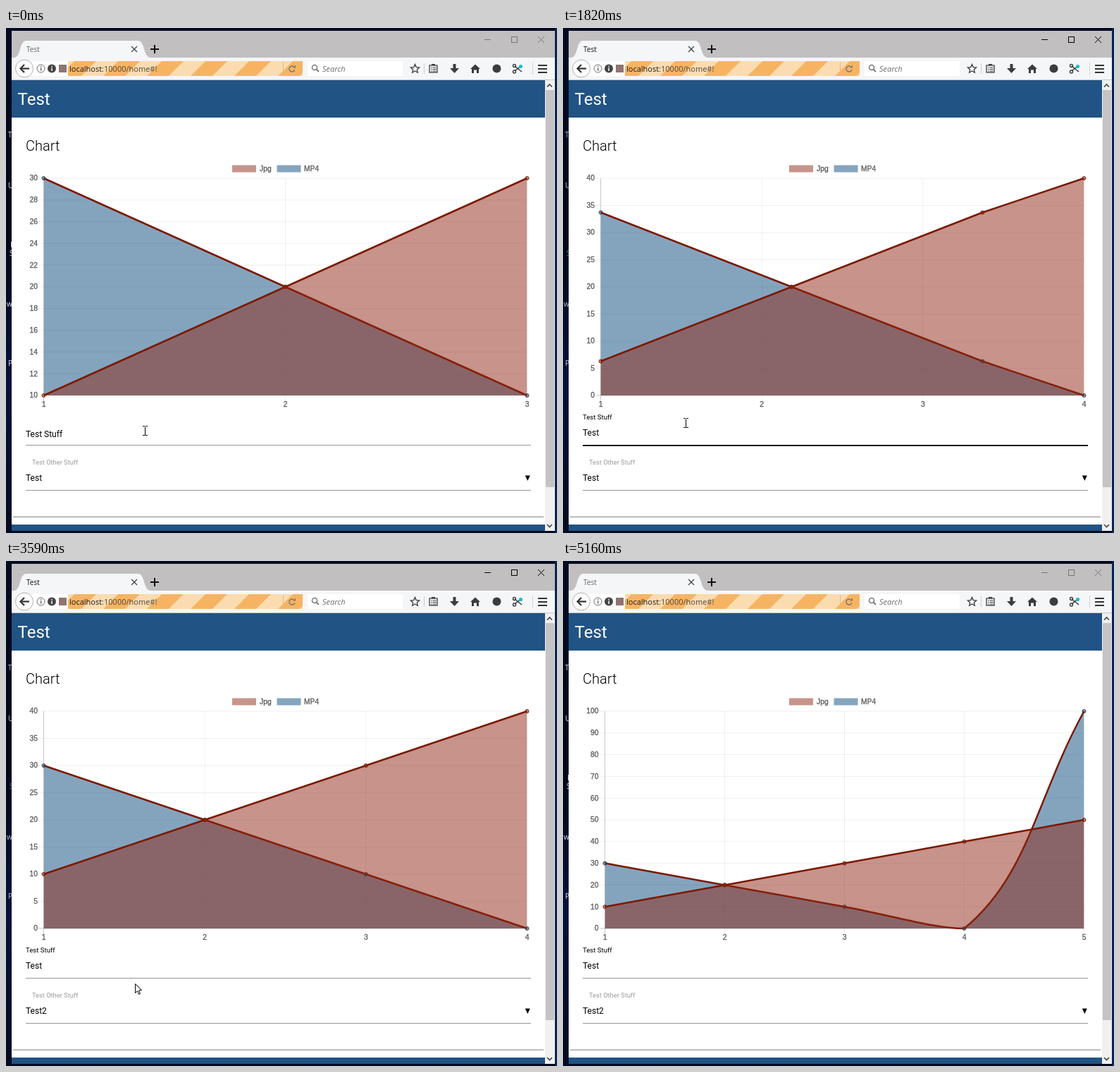
Animation of 782x716 px, one loop 5.19 s. Source, as an HTML page with a canvas:

```html
<!DOCTYPE html>
<html lang="en">
<head>
<meta charset="utf-8">
<title>Chart demo</title>
<style>
html, body { margin: 0; width: 100%; height: 100%; overflow: hidden; background: #030a20; }
canvas { display: block; }
</style>
</head>
<body>
<canvas id="stage" width="782" height="716"></canvas>
<script>
const ctx = document.getElementById('stage').getContext('2d');
const LOOP = 5190;
const UI = '"Open Sans", sans-serif';
const ROBOTO = 'Roboto, sans-serif';
const ARIAL = '"Liberation Sans", sans-serif';

// Moments of the interaction, in ms
const ACTIVATE = 550, TITLE_ON = 780, DEACTIVATE = 4930, TITLE_OFF = 5160;
const KEYS = [1040, 1160, 1220, 1340];
const MENU_OPEN = 2775, PICK = 3320;
const CHART_MS = 822, BLINK = 435;

const clamp = v => Math.max(0, Math.min(1, v));
const mix = (a, b, k) => a + (b - a) * k;
const ramp = (t, start, length) => clamp((t - start) / length);

function rect(x, y, w, h, color) {
  ctx.fillStyle = color;
  ctx.fillRect(x, y, w, h);
}

function text(s, x, y, font, color, align = 'left') {
  ctx.font = font;
  ctx.fillStyle = color;
  ctx.textAlign = align;
  ctx.fillText(s, x, y);
}

function line(points, color, width = 1) {
  ctx.beginPath();
  points.forEach(([x, y]) => ctx.lineTo(x, y));
  ctx.strokeStyle = color;
  ctx.lineWidth = width;
  ctx.stroke();
}

function shape(points, fill, stroke, width = 1) {
  ctx.beginPath();
  points.forEach(([x, y]) => ctx.lineTo(x, y));
  ctx.closePath();
  paint(fill, stroke, width);
}

function circle(x, y, r, fill, stroke, width = 1) {
  ctx.beginPath();
  ctx.arc(x, y, r, 0, 2 * Math.PI);
  paint(fill, stroke, width);
}

function paint(fill, stroke, width) {
  if (fill) { ctx.fillStyle = fill; ctx.fill(); }
  if (stroke) { ctx.strokeStyle = stroke; ctx.lineWidth = width; ctx.stroke(); }
}

function clipped(x, y, w, h, draw) {
  ctx.save();
  ctx.beginPath();
  ctx.rect(x, y, w, h);
  ctx.clip();
  draw();
  ctx.restore();
}

// ---- Desktop and browser window ----

function drawDesktop(active) {
  const sky = ctx.createLinearGradient(0, 0, 0, 716);
  sky.addColorStop(0, '#030a22');
  sky.addColorStop(0.4, '#020617');
  sky.addColorStop(0.7, '#04123a');
  sky.addColorStop(1, '#030a20');
  rect(0, 0, 782, 716, sky);
  rect(779, 0, 3, 716, '#0a2450');
  const ink = active ? '#b9c4d4' : '#e4e8ee';
  [['T', 3, 155], ['U', 3, 227], ['w', 1, 395], ['P', 3, 479]]
    .forEach(([s, x, y]) => text(s, x, y, '10px ' + UI, ink));
  if (!active) text('I', 6, 311, '10px ' + UI, ink);
  text('S', 5, 323, '10px ' + UI, active ? '#5f7fb4' : ink);
}

function drawTitleBar(lit) {
  const ink = lit ? '#000' : '#777';
  rect(8, 4, 771, 709, '#f5f6f7');
  rect(8, 4, 771, 38, '#c1bfc0');
  ctx.beginPath();
  ctx.moveTo(11, 42);
  ctx.bezierCurveTo(22, 42, 18, 18, 29, 18);
  ctx.lineTo(187, 18);
  ctx.bezierCurveTo(198, 18, 194, 42, 206, 42);
  paint('#f5f6f7');
  text('Test', 29, 34, '10px ' + UI, lit ? '#111' : '#666');
  line([[178, 26], [186, 34]], '#444', 1.2);
  line([[186, 26], [178, 34]], '#444', 1.2);
  rect(205, 29, 12, 2, '#111');
  rect(210, 24, 2, 12, '#111');
  rect(679, 16, 9, 1, ink);
  ctx.strokeStyle = ink;
  ctx.lineWidth = 1;
  ctx.strokeRect(717.5, 12.5, 8, 8);
  line([[755, 12], [764, 21]], ink);
  line([[764, 12], [755, 21]], ink);
}

function drawAddressBar() {
  rect(26, 47, 395, 21, '#fff');
  clipped(88, 47, 333, 21, () => {
    rect(88, 47, 333, 21, '#fbdcb0');
    for (let x = 76; x < 440; x += 62) {
      shape([[x + 21, 47], [x + 52, 47], [x + 31, 68], [x, 68]], '#f6b463');
    }
  });
  circle(26, 57.5, 12.5, '#fcfcfc', '#b0b0b0');
  line([[33, 57.5], [21, 57.5]], '#333', 2.2);
  line([[26, 52], [20.5, 57.5], [26, 63]], '#333', 2.2);
  circle(49.5, 57.5, 5.5, null, '#666');
  rect(49, 56.5, 1.3, 4, '#555');
  rect(49, 54, 1.3, 1.4, '#555');
  circle(65, 57.5, 6, '#444');
  rect(64.3, 56.5, 1.5, 4.5, '#fff');
  rect(64.3, 53.8, 1.5, 1.6, '#fff');
  rect(75, 52, 11, 11, '#8f7472');
  text('localhost', 90, 62, '11px ' + UI, '#1a1a1a');
  const host = ctx.measureText('localhost').width;
  text(':10000/home#!', 90 + host, 62, '11px ' + UI, '#4c453c');
  rect(393, 48, 1, 19, '#e0b880');
  ctx.beginPath();
  ctx.arc(406, 58, 4, 0.3, 5.3);
  paint(null, '#777', 1.5);
  shape([[407, 56.5], [411, 56.5], [411, 52.5]], '#777');

  rect(428, 47, 135, 21, '#fff');
  circle(438, 56, 3.5, null, '#777', 1.5);
  line([[440.5, 58.5], [444, 62]], '#777', 1.8);
  text('Search', 449, 62, 'italic 11px ' + UI, '#6d6d6d');
}

function drawToolIcons() {
  const ink = '#3c3c3c';
  const star = [];
  for (let i = 0; i < 10; i++) {
    const a = i * Math.PI / 5 - Math.PI / 2, r = i % 2 ? 3 : 6.5;
    star.push([580.5 + r * Math.cos(a), 58 + r * Math.sin(a)]);
  }
  shape(star, null, ink, 1.3);
  rect(593, 50, 1, 15, '#ccc');
  ctx.strokeStyle = ink;
  ctx.lineWidth = 1.3;
  ctx.strokeRect(601, 53, 11, 10);
  rect(604, 51, 5, 2, ink);
  [55.5, 58, 60.5].forEach(y => {
    rect(603, y, 1.5, 1, ink);
    rect(605.5, y, 5, 1, ink);
  });
  rect(634.5, 51, 4, 7, ink);
  shape([[630, 57], [643, 57], [636.5, 64]], ink);
  shape([[659, 58], [666, 51.5], [673, 58], [671, 58], [671, 64], [668, 64],
    [668, 59.5], [664, 59.5], [664, 64], [661, 64], [661, 58]], ink);
  circle(696.5, 57.5, 6, ink);
  line([[722, 61], [732, 53]], ink, 1.6);
  line([[722, 54], [732, 62]], ink, 1.6);
  circle(721.5, 53.5, 2, null, ink, 1.4);
  circle(721.5, 62, 2, null, ink, 1.4);
  circle(730.5, 54.5, 2.6, '#18bcd8');
  rect(747, 49, 1, 17, '#d4d4d4');
  [52, 57, 62].forEach(y => rect(755, y, 13, 2, '#333'));
}

function drawPage() {
  rect(8, 73, 771, 1, '#c8c8c8');
  rect(8, 74, 757, 639, '#fff');
  rect(8, 74, 757, 53, '#215384');
  text('Test', 16.5, 109, '24px ' + ROBOTO, '#fff');
  text('Chart', 28, 174, '300 20px ' + ROBOTO, '#000');
  rect(10, 692.5, 753, 1.5, '#a8a8a8');
  rect(8, 704, 757, 9, '#215384');
  rect(765, 74, 14, 639, '#f0f0f0');
  rect(766, 88, 12, 563, '#c4c4c4');
  line([[768, 83.5], [771.5, 80], [775, 83.5]], '#444', 1.6);
  line([[768, 704], [771.5, 707.5], [775, 704]], '#444', 1.6);
}

// ---- Chart ----

const TOP = 213, BASE = 521, RIGHT = 739.5;
const SERIES = [
  { fill: 'rgba(11,75,127,.5)', dot: '#3c3c3c' },
  { fill: 'rgba(143,41,23,.5)', dot: '#7b1900' }
];

const CHARTS = [
  { left: 53.5, labelX: 45, min: 10, max: 30, step: 2, data: [[30, 20, 10], [10, 20, 30]] },
  { left: 53.5, labelX: 45, min: 0, max: 40, step: 5, data: [[30, 20, 10, 0], [10, 20, 30, 40]] },
  { left: 59.5, labelX: 50.5, min: 0, max: 100, step: 10,
    data: [[30, 20, 10, 0, 100], [10, 20, 30, 40, 50]] }
];

const xAt = (c, i) => mix(c.left, RIGHT, i / (c.data[0].length - 1));
const yAt = (c, v) => mix(BASE, TOP, (v - c.min) / (c.max - c.min));

// Spline nodes: x, y, incoming handle, outgoing handle
function nodes(c, values) {
  const pts = values.map((v, i) => [xAt(c, i), yAt(c, v)]);
  const cap = (x, y) => [
    Math.max(c.left, Math.min(RIGHT, x)),
    Math.max(TOP, Math.min(BASE, y))
  ];
  return pts.map((p, i) => {
    const a = pts[i - 1] || p, b = pts[i + 1] || p;
    const before = Math.hypot(p[0] - a[0], p[1] - a[1]);
    const after = Math.hypot(b[0] - p[0], b[1] - p[1]);
    const ka = 0.4 * before / (before + after), kb = 0.4 * after / (before + after);
    const dx = b[0] - a[0], dy = b[1] - a[1];
    return [...p, ...cap(p[0] - ka * dx, p[1] - ka * dy), ...cap(p[0] + kb * dx, p[1] + kb * dy)];
  });
}

CHARTS.forEach(c => { c.nodes = c.data.map(values => nodes(c, values)); });

function trace(list) {
  ctx.moveTo(list[0][0], list[0][1]);
  for (let i = 1; i < list.length; i++) {
    const a = list[i - 1], b = list[i];
    ctx.bezierCurveTo(a[4], a[5], b[2], b[3], b[0], b[1]);
  }
}

function chartText(s, x, y, align) {
  text(s, x, y, '10.3px ' + ARIAL, '#5e5e5e', align);
  ctx.strokeStyle = '#5e5e5e';
  ctx.lineWidth = 0.35;
  ctx.strokeText(s, x, y);
}

function drawAxes(c) {
  const faint = 'rgba(0,0,0,.075)', strong = 'rgba(0,0,0,.25)';
  for (let v = c.min; v <= c.max; v += c.step) {
    const y = yAt(c, v);
    line([[c.left - 7, y], [RIGHT, y]], v === 0 ? strong : faint, 0.85);
    chartText(v, c.labelX, y + 3.4, 'right');
  }
  c.data[0].forEach((_, i) => {
    const x = xAt(c, i);
    line([[x, TOP], [x, BASE + 7]], i ? faint : strong, 0.85);
    chartText(i + 1, x, 537, 'center');
  });
}

function drawChart(t) {
  const stage = t >= 3608 ? 2 : t >= 1640 ? 1 : 0;
  const c = CHARTS[stage], old = CHARTS[stage - 1];
  const p = stage ? ramp(t, [0, 1640, 3608][stage], CHART_MS) : 1;
  const k = 1 - (1 - p) ** 4;

  rect(321, 194.5, 34, 10, '#c7948b');
  chartText('Jpg', 360, 202.5, 'left');
  rect(384.5, 194.5, 34, 10, '#85a5bf');
  chartText('MP4', 423, 202.5, 'left');
  drawAxes(c);

  SERIES.forEach((s, n) => {
    const list = c.nodes[n].map((node, i) => {
      const from = old && old.nodes[n][i];
      return from ? node.map((v, j) => mix(from[j], v, k)) : node;
    });
    clipped(c.left, TOP - 2, RIGHT - c.left, BASE - TOP + 2, () => {
      ctx.beginPath();
      trace(list);
      ctx.lineTo(list[list.length - 1][0], BASE);
      ctx.lineTo(list[0][0], BASE);
      paint(s.fill);
    });
    clipped(c.left - 3, TOP - 2, RIGHT - c.left + 5, BASE - TOP + 4, () => {
      ctx.beginPath();
      trace(list);
      paint(null, '#7b1900', 2.5);
    });
    list.forEach(([x, y]) => circle(x, y, 2.5, s.fill, s.dot, 1));
  });
}

// ---- Form ----

function underline(y, focus) {
  const g = Math.round(mix(150, 0, focus));
  rect(28, y, 717, 1, `rgb(${g},${g},${g})`);
  if (focus) rect(28, y + 1, 717, 1, `rgba(0,0,0,${focus * 0.85})`);
}

const blinkOn = (t, since) => Math.floor((t - since) / BLINK) % 2 === 0;

function drawForm(t) {
  const lift = 1 - (1 - ramp(t, ACTIVATE, 165)) ** 2;
  text('Test Stuff', 28, mix(579.5, 554.5, lift), mix(12, 9.6, lift) + 'px ' + ROBOTO, '#000');
  const typed = KEYS.filter(k => t >= k);
  const value = 'Test'.slice(0, typed.length);
  text(value, 28, 578, '12px ' + ROBOTO, '#000');
  const lastKey = typed.length ? typed[typed.length - 1] : ACTIVATE;
  if (t >= ACTIVATE && t < MENU_OPEN && blinkOn(t, lastKey)) {
    rect(28 + Math.round(ctx.measureText(value).width), 566, 1, 15, '#000');
  }
  underline(591, ramp(t, ACTIVATE, 245) - ramp(t, MENU_OPEN, 245));

  text('Test Other Stuff', 37, 618.5, '9.3px ' + ROBOTO, '#9a9a9a');
  text(t < PICK ? 'Test' : 'Test2', 28, 642, '12px ' + ROBOTO, '#000');
  if (t >= MENU_OPEN && t < PICK && blinkOn(t, MENU_OPEN)) rect(28, 630, 1, 15, '#000');
  shape([[736.8, 634.5], [743.8, 634.5], [740.3, 642]], '#000');
  underline(655, ramp(t, MENU_OPEN, 130) - ramp(t, PICK, 245));
}

function drawMenu(t, mouse) {
  if (t < MENU_OPEN || t > PICK + 185) return;
  const p = ramp(t, MENU_OPEN, 230);
  const height = 126 * (1 - (1 - p) ** 3);
  const hover = t < PICK ? Math.floor((mouse[1] - 530) / 42) : 1;
  ctx.save();
  ctx.globalAlpha = Math.sin(p * Math.PI / 2) * (1 - ramp(t, PICK, 185));
  ctx.shadowColor = 'rgba(0,0,0,.25)';
  ctx.shadowBlur = 3;
  ctx.shadowOffsetY = 1;
  rect(28, 530, 717, height, '#fff');
  ctx.shadowColor = 'transparent';
  clipped(28, 530, 717, height, () => {
    ['Test', 'Test2', 'Test3'].forEach((s, i) => {
      const y = 530 + 42 * i;
      if (i === hover) rect(28, y, 717, 42, '#f0f0f0');
      text(s, 41.5, y + 26, '13.2px ' + ROBOTO, '#26a69a');
    });
  });
  ctx.restore();
}

// ---- Pointer ----

const PATH = [
  [30, 197, 571], [520, 173, 560], [1160, 173, 560], [1340, 174, 559.5],
  [2180, 174, 559.5], [2640, 122, 637], [2960, 122, 637], [3250, 160, 598],
  [3400, 160, 598], [3800, 210, 600], [4160, 228, 603], [4385, 240, 680]
];

function mouseAt(t) {
  const i = PATH.findIndex(k => k[0] > t);
  if (i === 0) return PATH[0].slice(1);
  if (i < 0) return null;
  const a = PATH[i - 1], b = PATH[i];
  const p = (t - a[0]) / (b[0] - a[0]);
  const k = p * p * (3 - 2 * p);
  return [mix(a[1], b[1], k), mix(a[2], b[2], k)];
}

function drawPointer(t, [px, py]) {
  const x = Math.round(px), y = Math.round(py);
  const at = list => list.map(([dx, dy]) => [x + dx + 0.5, y + dy + 0.5]);
  const overMenu = t >= MENU_OPEN && t < PICK;
  if (overMenu || (t < PICK && y > 622)) {
    shape(at([[0, 1], [1, 0], [2, 0], [3, 1], [3, 6], [6, 6], [7, 7], [9, 7], [10, 8],
      [12, 9], [12, 13], [10, 17], [10, 19], [2, 19], [1, 16], [-4, 11], [-4, 9],
      [-2, 9], [0, 11]]), '#fff', '#000');
    [4, 7, 10].forEach(dx => line(at([[dx, 8], [dx, 11]]), '#000'));
  } else if (t < PICK && y < 592) {
    line(at([[0, -6], [0, 6]]), '#000');
    [-7, 6].forEach(dy => {
      rect(x - 3, y + dy, 3, 1, '#000');
      rect(x + 1, y + dy, 3, 1, '#000');
    });
  } else {
    shape(at([[0, 0], [0, 13], [3, 10], [5, 15], [7, 14], [5, 9.5], [9, 9]]), '#fff', '#000');
  }
}

function draw(t) {
  drawDesktop(t >= ACTIVATE && t < DEACTIVATE);
  drawTitleBar(t >= TITLE_ON && t < TITLE_OFF);
  drawAddressBar();
  drawToolIcons();
  drawPage();
  drawChart(t);
  drawForm(t);
  const mouse = mouseAt(t);
  drawMenu(t, mouse);
  if (mouse) drawPointer(t, mouse);
}

const start = performance.now();
function tick() {
  draw((performance.now() - start) % LOOP);
  requestAnimationFrame(tick);
}
tick();
</script>
</body>
</html>
```
